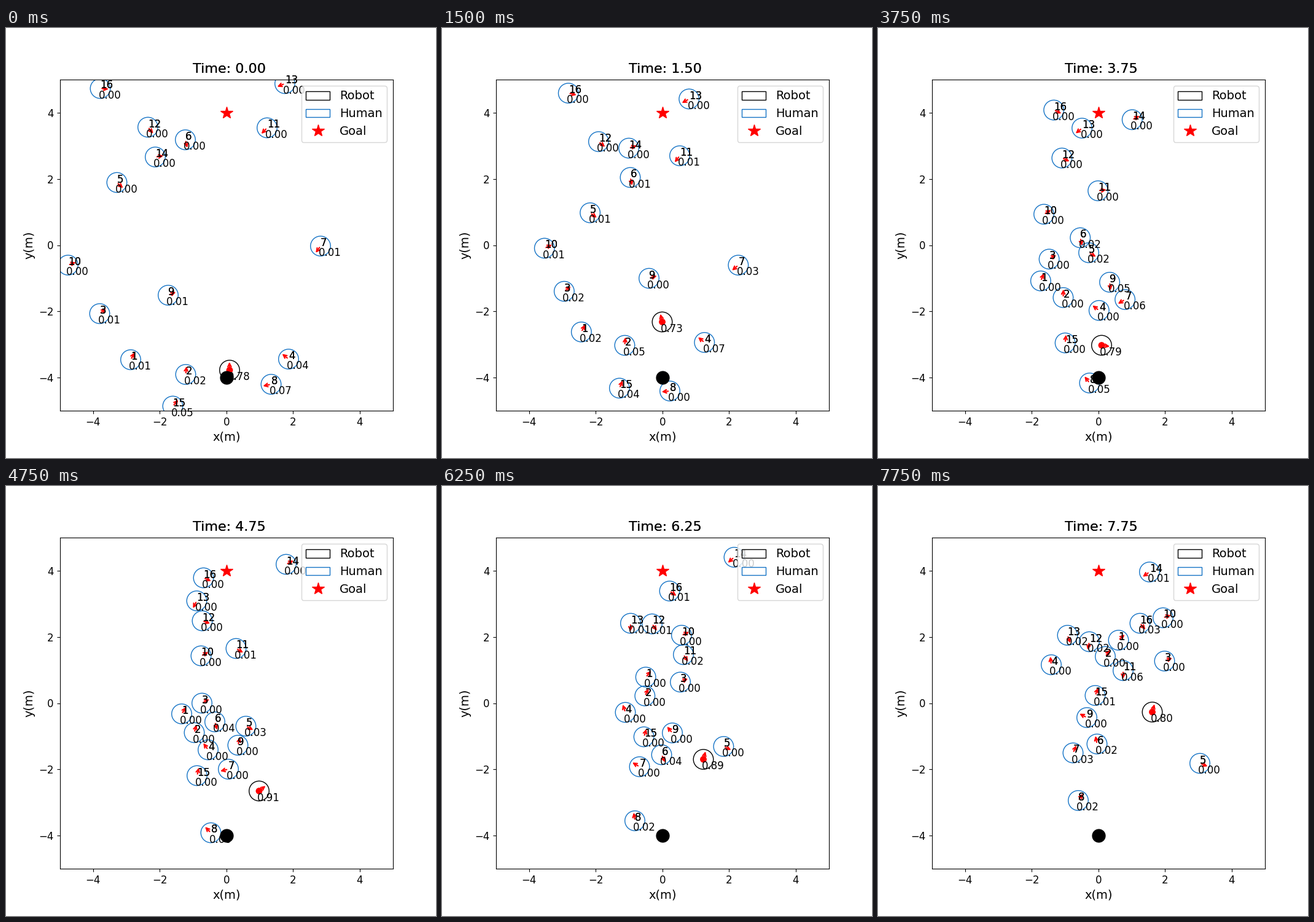
A matplotlib script for the animation above (8000 ms loop, 700 by 700 pixels).

```python
import numpy as np
import matplotlib.pyplot as plt
from matplotlib.animation import FuncAnimation
from matplotlib.patches import ArrowStyle, Circle, FancyArrowPatch

FRAMES, STEP = 32, 0.25
CLOCK = np.arange(FRAMES) * STEP
RADIUS = 0.3
BLUE = "#1674c6"

# way-point times: the more an agent turns, the more points it has
TIMES = {4: [0, 2.5, 4.75, 7.75],
         5: [0, 2.5, 4.75, 6.25, 7.75],
         6: [0, 1.5, 2.5, 4.75, 6.25, 7.75],
         7: [0, 1.5, 2.5, 3.75, 4.75, 6.25, 7.75]}

plt.rcParams["font.family"] = "DejaVu Sans"
fig, ax = plt.subplots(figsize=(7, 7), dpi=100)
ax.set_xlim(-5, 5)
ax.set_ylim(-5, 5)
ax.tick_params(labelsize=12)
ax.set_xlabel("x(m)", fontsize=14)
ax.set_ylabel("y(m)", fontsize=14)


def smooth_path(points):
    """Position and unit direction at every step of a smooth curve."""
    times = np.array(TIMES[len(points)])
    slope = np.gradient(points, times, axis=0, edge_order=2)
    i = np.clip(np.searchsorted(times, CLOCK, side="right") - 1, 0, len(times) - 2)
    h = np.diff(times)[i][:, None]
    s = (CLOCK - times[i])[:, None] / h
    p, q, u, v = points[i], points[i + 1], slope[i] * h, slope[i + 1] * h
    place = ((2 * s**3 - 3 * s**2 + 1) * p + (3 * s**2 - 2 * s**3) * q
             + (s**3 - 2 * s**2 + s) * u + (s**3 - s**2) * v)
    rate = (6 * (s**2 - s) * (p - q)
            + (3 * s**2 - 4 * s + 1) * u + (3 * s**2 - 2 * s) * v)
    return place, rate / np.hypot(rate[:, :1], rate[:, 1:])


class Agent:
    def __init__(self, name, *pixels):
        points = (np.array(pixels) - (358.75, 353.5)) / (54.25, -53.9)
        self.place, self.heading = smooth_path(points)
        color = BLUE if name else "black"
        self.circle = ax.add_patch(Circle((0, 0), RADIUS, fill=False, ec=color, lw=1))
        self.dots = [self.circle]
        if not name:
            self.dots.append(ax.add_patch(Circle((0, 0), 0.1, color="red", lw=0)))
        self.arrow = ax.add_patch(FancyArrowPatch(
            (0, 0), (1, 0), color="red", lw=1.5, mutation_scale=1,
            arrowstyle=ArrowStyle("->", head_length=4, head_width=2)))
        # labels are laid down twice, which makes them slightly heavier
        self.names = [ax.text(0, 0, name, fontsize=12) for _ in range(2)]
        self.note = ax.text(0, 0, "", fontsize=12)

    def attention(self, other):
        """Weight of this agent for another: high when near and approaching."""
        gap = other.place - self.place
        distance = np.hypot(*gap.T)
        approach = (gap * self.heading).sum(axis=1) / distance
        return 0.18 * np.maximum(approach, 0) * np.exp(-distance / 1.6)

    def show(self, k):
        x, y = self.place[k]
        for dot in self.dots:
            dot.center = x, y
        self.arrow.set_positions((x, y), self.place[k] + RADIUS * self.heading[k])
        for text in self.names:
            text.set_position((x, y))
        self.note.set_position((x - 0.05, y - RADIUS))
        self.note.set_text(f"{self.weight[k]:.2f}")


robot = Agent("", (364, 557), (358.5, 478.5), (351.5, 472.5), (364, 516.5),
              (412, 496.5), (425.5, 445), (446.5, 368))

humans = [
    Agent("1", (203, 540), (244, 460.5), (286, 371), (391.5, 251)),
    Agent("2", (292.5, 564), (300.5, 483), (306.5, 401.5), (370, 277.5)),
    Agent("3", (152.5, 465), (233, 405), (319, 353.5), (466.5, 285)),
    Agent("4", (460, 539), (401, 490), (329, 429.5), (282, 291)),
    Agent("5", (180.5, 251.5), (284.5, 331), (390.5, 391), (524, 451.5)),
    Agent("6", (292, 182), (316.5, 285.5), (340, 384), (357.5, 437.5), (356.5, 420)),
    Agent("7", (512, 355), (453.5, 408), (362, 461), (321.5, 457), (317.5, 434.5)),
    Agent("8", (431.5, 580), (371, 591), (358, 590), (333.5, 564.5),
          (314, 545), (326, 512)),
    Agent("9", (264, 435), (337, 407.5), (365, 400.5), (377.5, 422),
          (375, 402), (340, 377)),
    Agent("10", (101, 386), (212, 336.5), (317.5, 276.5), (464, 214.5)),
    Agent("11", (425, 162.5), (387, 208), (355, 251.5), (374.5, 264.5),
          (393, 274.5), (399, 300.5)),
    Agent("12", (231, 161.5), (273, 198), (319.5, 219.5), (342, 224.5), (344, 253.5)),
    Agent("13", (454, 90.5), (371, 135), (310.5, 187), (307, 223.5), (308.5, 243)),
    Agent("14", (243, 210), (348, 180), (456, 127.5), (475.5, 116), (442, 140)),
    Agent("15", (271.5, 615.5), (298, 558.5), (311, 471.5), (353.5, 341)),
    Agent("16", (153.5, 98.5), (241, 115.5), (321.5, 149.5), (370.5, 171),
          (426.5, 223.5)),
]
for human in humans:
    human.weight = human.attention(robot)
robot.weight = 1 - sum(human.weight for human in humans)

goal, = ax.plot(0, 4, "*", color="red", ms=15)
ax.plot(0, -4, "o", color="black", ms=15, zorder=4)
ax.legend([robot.circle, humans[0].circle, goal], ["Robot", "Human", "Goal"],
          fontsize=14, loc="upper right")
titles = [ax.text(-1, 5.2, "", fontsize=16) for _ in range(2)]


def update(k):
    for agent in [robot, *humans]:
        agent.show(k)
    for title in titles:
        title.set_text(f"Time: {CLOCK[k]:.2f}")


anim = FuncAnimation(fig, update, frames=FRAMES, interval=1000 * STEP,
                     repeat=True, repeat_delay=0)
plt.show()
```
